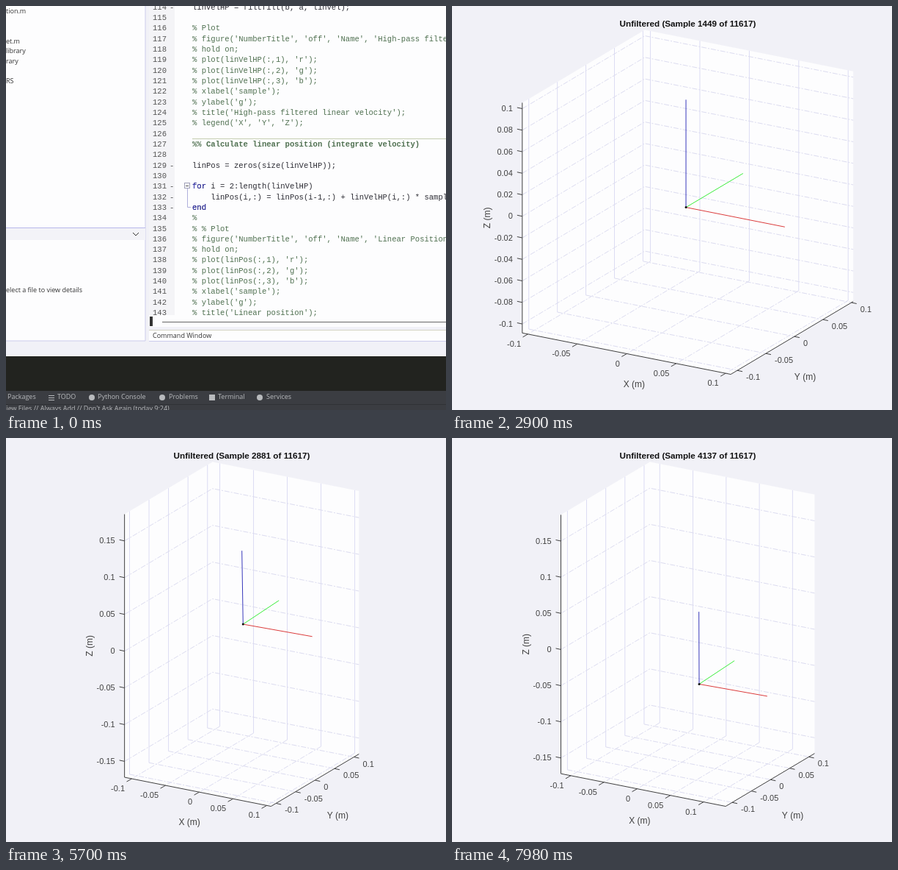
These frames come from a looping animation (600 by 549 pixels, 8000 ms). An HTML page with a canvas:

```html
<!DOCTYPE html>
<html lang="en">
<head>
<meta charset="utf-8">
<title>Sensor position plot</title>
<style>
html, body { margin: 0; width: 100%; height: 100%; overflow: hidden; background: #f1f1f7; }
canvas { display: block; width: 600px; height: 549px; }
</style>
</head>
<body>
<canvas id="stage" width="600" height="549"></canvas>
<script>
const ctx = document.getElementById('stage').getContext('2d');
const LOOP = 8000, EDITOR_END = 20;
const CENTER_X = 321.5, BOTTOM = 500.5, HEIGHT = 468;
const SANS = '"Liberation Sans", Arial, sans-serif';
const UI = '9px "Open Sans", sans-serif';
const MONO = '10.55px "Liberation Mono", monospace';
const INK = '#404040', PAPER = '#fdfdfe', BACKDROP = '#f1f1f7';
const ARROW_LENGTH = .1;

// Time, plotted step, cycles of the vertical swing (0 is its first low point)
const TIMELINE = [
  [0, 1, -.5], [2900, 181, -.5], [3920, 239, -.138],
  [4780, 292, .692], [6580, 424, 2.705], [7980, 517, 4.09]
];

const clamp = p => Math.max(0, Math.min(1, p));
const smooth = p => .5 - .5 * Math.cos(Math.PI * clamp(p));
const mix = (a, b, p) => a + (b - a) * p;

function timeline(t) {
  const i = Math.max(1, TIMELINE.findIndex(k => k[0] > t));
  const [a, b] = t < TIMELINE.at(-1)[0] ? [TIMELINE[i - 1], TIMELINE[i]] : TIMELINE.slice(-2);
  const p = (t - a[0]) / (b[0] - a[0]);
  return [mix(a[1], b[1], p), mix(a[2], b[2], p)];
}

// Azimuth 30 degrees, elevation 20 degrees, orthographic
const RAD = Math.PI / 180, AZIMUTH = 30 * RAD, ELEVATION = 20 * RAD;
const xAxis = az => [Math.cos(az), Math.sin(az) * Math.sin(ELEVATION)];
const yAxis = az => [Math.sin(az), -Math.cos(az) * Math.sin(ELEVATION)];
const RISE = Math.cos(ELEVATION);

const TROUGH = -.0717, PEAK = .0863;
function height(cycles, t) {
  const rest = -.0084 * clamp(t / 2900) ** 2;
  const top = cycles < 0 ? rest : PEAK;
  return mix(top, TROUGH, .5 + .5 * Math.cos(2 * Math.PI * cycles));
}

// The axes only ever grow, so the arrow tips always fit
function state(t) {
  const [step, cycles] = timeline(t);
  const sec = t / 1000;
  const late = smooth((t - 7380) / 600), turn = smooth((t - 3920) / 860);
  const sway = .0075 * Math.cos(Math.PI * (t - 4780) / 1800) * clamp(t / 4780);
  const drift = .0055 * clamp(t / 2900);
  const highest = cycles > 0 ? height(Math.min(cycles, .5), t) : drift;
  const az = AZIMUTH - 2.6 * RAD * turn;
  return {
    sample: 1 + 8 * Math.round(step),
    x: sway + .02 * late,
    z: height(cycles, t),
    min: [-.1005 - .0018 * sec, -.11 - .0005 * sec - .003 * late, height(Math.min(cycles, 0), t) - ARROW_LENGTH],
    max: [.104 + .0004 * sec + .026 * late, .099 + .014 * clamp((sec - 1) / 3.5) ** 2 + .002 * late,
      Math.max(drift, highest) + ARROW_LENGTH],
    arrows: [
      ['#dc3c3c', xAxis(az)],
      ['#3cee3c', yAxis(az)],
      ['#3838bc', [1.9 * (sway - .0075) * turn, -RISE]]
    ]
  };
}

function ticks(lo, hi, step) {
  const out = [];
  for (let i = Math.ceil(lo / step - 1e-6); i * step <= hi + 1e-6; i++) out.push(i * step);
  return out;
}

function line(points, color, dash = []) {
  ctx.beginPath();
  points.forEach(p => ctx.lineTo(...p));
  ctx.setLineDash(dash);
  ctx.strokeStyle = color;
  ctx.lineWidth = 1;
  ctx.stroke();
  ctx.setLineDash([]);
}

function text(s, x, y, font, color = INK, align = 'left') {
  ctx.font = font;
  ctx.fillStyle = color;
  ctx.textAlign = align;
  ctx.textBaseline = 'middle';
  ctx.fillText(s, x, y);
}

function rect(x, y, w, h, color) {
  ctx.fillStyle = color;
  ctx.fillRect(x, y, w, h);
}

function dot(x, y, r, color) {
  ctx.beginPath();
  ctx.arc(x, y, r, 0, 7);
  ctx.fillStyle = color;
  ctx.fill();
}

function drawPlot(t) {
  const { sample, x: px, z: pz, min, max, arrows } = state(t);
  const [x0, y0, z0] = min, [x1, y1, z1] = max;
  const [cx, cy, cz] = min.map((v, i) => (v + max[i]) / 2);
  const ux = xAxis(AZIMUTH), uy = yAxis(AZIMUTH);
  const scale = HEIGHT / ((x1 - x0) * ux[1] - (y1 - y0) * uy[1] + (z1 - z0) * RISE);
  const project = (x, y, z) => [
    CENTER_X + scale * ((x - cx) * ux[0] + (y - cy) * uy[0]),
    BOTTOM - HEIGHT / 2 + scale * ((x - cx) * ux[1] + (y - cy) * uy[1] - (z - cz) * RISE)
  ];

  rect(0, 0, 600, 549, BACKDROP);
  const left = project(x0, y0, z0), front = project(x1, y0, z0), right = project(x1, y1, z0);
  const leftTop = project(x0, y0, z1);
  ctx.beginPath();
  [left, front, right, project(x1, y1, z1), project(x0, y1, z1), leftTop].forEach(p => ctx.lineTo(...p));
  ctx.fillStyle = PAPER;
  ctx.fill();

  const xs = ticks(x0, x1, .05), ys = ticks(y0, y1, .05), zs = ticks(z0, z1, z1 - z0 > .24 ? .05 : .02);
  const upright = '#dcdcf3', slanted = '#dcdcf0', dash = [7, 2, 2, 2];
  xs.forEach(x => {
    line([project(x, y1, z1), project(x, y1, z0)], upright);
    line([project(x, y1, z0), project(x, y0, z0)], slanted, dash);
  });
  ys.forEach(y => {
    line([project(x0, y, z1), project(x0, y, z0)], upright);
    line([project(x0, y, z0), project(x1, y, z0)], slanted, dash);
  });
  zs.forEach(z => line([project(x0, y0, z), project(x0, y1, z), project(x1, y1, z)], slanted, dash));

  line([leftTop, left, front, right], INK);
  const tick = (v, [x, y], tx, ty, lx, ly, align) => {
    line([[x, y], [x + tx, y + ty]], INK);
    text(String(+v.toFixed(2) || 0), x + lx, y + ly, '11px ' + SANS, INK, align);
  };
  xs.forEach(x => tick(x, project(x, y0, z0), -7, 4, -9.5, 14, 'right'));
  ys.forEach(y => tick(y, project(x1, y, z0), 7, 1.5, 12, 10, 'left'));
  zs.forEach(z => tick(z, project(x0, y0, z), -7, -1.5, -13, .5, 'right'));

  // Axis names sit beside the middle of each edge, shifting with its length
  const name = (s, x, y) => text(s, x, y, '12px ' + SANS, INK, 'center');
  const wx = front[0] - left[0], wy = right[0] - front[0];
  name('X (m)', (left[0] + front[0]) / 2 + .256 * (wx - 244), (left[1] + front[1]) / 2 + 42);
  name('Y (m)', (front[0] + right[0]) / 2 + 31 - .28 * (wy - 120),
    (front[1] + right[1]) / 2 + 48.5 + .12 * (wy - 120));
  ctx.save();
  ctx.translate(left[0] - 47, (left[1] + leftTop[1]) / 2);
  ctx.rotate(-Math.PI / 2);
  name('Z (m)', 0, 0);
  ctx.restore();
  text(`Unfiltered (Sample ${sample} of 11617)`, CENTER_X, 25, 'bold 11.7px ' + SANS, '#111', 'center');

  const origin = project(px, 0, pz);
  arrows.forEach(([color, dir]) =>
    line([origin, origin.map((v, i) => v + dir[i] * scale * ARROW_LENGTH)], color));
  dot(...origin, 1.5, '#111');
}

const plotCode = (name, label, title) => `% figure('NumberTitle', 'off', 'Name', '${label}');
% hold on;
% plot(${name}(:,1), 'r');
% plot(${name}(:,2), 'g');
% plot(${name}(:,3), 'b');
% xlabel('sample');
% ylabel('g');
% title('${title}');`;

const CODE = `linVelHP = filtfilt(b, a, linVel);

% Plot
${plotCode('linVelHP', 'High-pass filtered linear velocity', 'High-pass filtered linear velocity')}
% legend('X', 'Y', 'Z');

%% Calculate linear position (integrate velocity)

linPos = zeros(size(linVelHP));

for i = 2:length(linVelHP)
    linPos(i,:) = linPos(i-1,:) + linVelHP(i,:) * samplePeriod;
end
%
% % Plot
${plotCode('linPos', 'Linear Position', 'Linear position')}`.split('\n');

function drawEditor() {
  const edge = '#ccccec', dark = '#333', pale = '#b8babd';
  rect(0, 0, 600, 549, BACKDROP);
  rect(0, 0, 190, 455, PAPER);
  rect(195, 0, 405, 436, PAPER);
  rect(195, 0, 35, 420, '#f4f4f7');
  rect(195, 440, 405, 16, PAPER);
  line([[190, 0], [190, 455], [0, 455]], edge);
  rect(0, 301, 190, 17, '#f3f3f8');
  line([[0, 301.5], [190, 301.5]], '#b8b8ea');
  line([[173, 308], [177, 312], [181, 308]], dark);
  [['tion.m', 8], ['et.m', 49], ['library', 62], ['rary', 76], ['RS', 103], ['elect a file to view details', 387]]
    .forEach(([s, y]) => text(s, 0, y, UI, dark));

  line([[254, 180.5], [600, 180.5]], '#c4cdb0');
  CODE.forEach((s, i) => {
    const y = 2 + i * 14.32;
    const comment = s.startsWith('%'), section = s.startsWith('%%');
    text(114 + i, 200, y, MONO, '#555');
    if (s && !comment) text('-', 223, y, MONO, '#555');
    text(s, 254, y, (section ? 'bold ' : '') + MONO, comment ? '#4f7050' : '#2c2c34');
    if (/^(for|end)/.test(s)) text(s.slice(0, 3), 254, y, MONO, '#3434b4');
  });
  ctx.strokeStyle = '#a0a0b8';
  ctx.strokeRect(243.5, 240.5, 7, 7);
  line([[245, 244.5], [249, 244.5]], '#555');
  line([[247.5, 248], [247.5, 273.5], [252, 273.5]], '#b0b0dc');
  rect(196, 422, 4, 13, dark);
  line([[213, 429.5], [600, 429.5]], '#666');
  line([[195, 440.5], [600, 440.5]], '#d4d4c4');
  line([[195, 455.5], [600, 455.5]], edge);
  text('Command Window', 200, 449, UI, dark);

  rect(0, 476, 600, 48, '#22231f');
  rect(0, 523, 600, 26, '#3b3d42');
  [['Packages', 2], ['TODO', 70], ['Python Console', 125], ['Problems', 222], ['Terminal', 289], ['Services', 355]]
    .forEach(([s, x]) => text(s, x, 532, UI, pale));
  [529, 532, 535].forEach(y => line([[58, y + .5], [66, y + .5]], pale));
  [117, 213, 346].forEach(x => dot(x, 532, 4, pale));
  rect(277, 528, 8, 8, pale);
  line([[0, 541.5], [600, 541.5]], '#303236');
  text("View Files // Always Add // Don't Ask Again (today 9:24)", -5, 548, UI, pale);
}

const start = performance.now();
function frame() {
  const t = (performance.now() - start) % LOOP;
  if (t < EDITOR_END) drawEditor();
  else drawPlot(t);
  requestAnimationFrame(frame);
}
frame();
</script>
</body>
</html>
```
